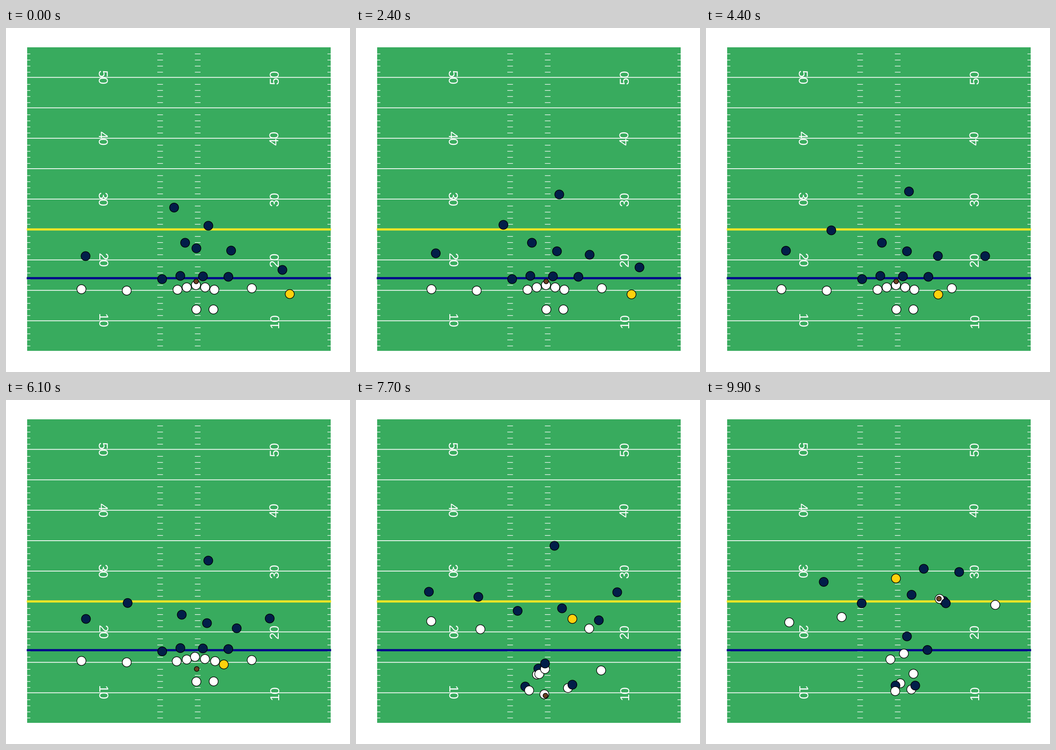
Write a matplotlib script that moves like this. It is 748x748 px and loops after 10 s.

```python
import numpy as np
import matplotlib.pyplot as plt
from matplotlib.animation import FuncAnimation
from matplotlib.patches import Circle, Rectangle

SIZE, DPI, FRAMES = 748, 100, 100
PT = 72 / DPI
GREEN, NAVY, GOLD, BROWN = "#38ab5e", "#021e49", "#ffd10d", "#6b4023"
LEFT, RIGHT, TOP, BOTTOM = 46, 706, 42, 702
SNAP, THROW, CATCH, END = 60, 77, 85, 99

plt.rcParams["text.hinting"] = "none"
fig = plt.figure(figsize=(SIZE / DPI, SIZE / DPI), dpi=DPI, facecolor="white")
ax = fig.add_axes([0, 0, 1, 1])
ax.set(xlim=(0, SIZE), ylim=(SIZE, 0))
ax.axis("off")


def yard_y(yard):
    return 636.6 - 13.23 * (yard - 10)


def rows(ys, x0, x1, width, color="white"):
    ax.hlines(ys, x0, x1, colors=color, linewidth=width * PT, snap=False)


def draw_field():
    ax.add_patch(Rectangle((LEFT, TOP), RIGHT - LEFT, BOTTOM - TOP,
                           facecolor=GREEN, edgecolor="none", zorder=0))
    rows([yard_y(y) for y in range(10, 51, 5)], LEFT, RIGHT, 1.7)
    ticks = [yard_y(y) + 1.9 for y in range(6, 55) if y % 5]
    for x0, x1 in ((LEFT, 53), (329, 341.3), (410.7, 423), (699, RIGHT)):
        rows(ticks, x0, x1, 1.2)
    for yard in range(10, 51, 10):
        for x, dy, turn in ((200.4, 0.3, -90), (592.5, -0.8, 90)):
            ax.text(x, yard_y(yard) + dy, str(yard), rotation=turn,
                    rotation_mode="anchor", ha="center", va="baseline",
                    color="white", family="Liberation Sans",
                    fontsize=28.2 * PT)
    rows(544, LEFT - 1, RIGHT + 1, 4.7, "#00008b")
    rows(438, LEFT - 1, RIGHT + 1, 4.7, "#fde725")


def glide(keys, values):
    """Monotone cubic through the key values, sampled on every frame."""
    t, p = np.asarray(keys, float), np.asarray(values, float)
    h = np.diff(t)
    d = np.diff(p) / h
    m = np.concatenate(([d[0]], np.zeros(len(d) - 1), [d[-1]]))
    for i in range(1, len(d)):
        if d[i - 1] * d[i] > 0:
            m[i] = 2 * d[i - 1] * d[i] / (d[i - 1] + d[i])
    f = np.arange(FRAMES)
    i = np.clip(np.searchsorted(t, f, side="right") - 1, 0, len(h) - 1)
    s = (f - t[i]) / h[i]
    return ((1 + 2 * s) * (1 - s) ** 2 * p[i] + s * (1 - s) ** 2 * h[i] * m[i]
            + s * s * (3 - 2 * s) * p[i + 1] + s * s * (s - 1) * h[i] * m[i + 1])


def smooth(a, b):
    s = np.clip((np.arange(FRAMES) - a) / (b - a), 0, 1)
    return (s * s * (3 - 2 * s))[:, None]


def route(start, throw, catch, end, shift=None):
    """Start, optional shifts before the snap, then three spots after it."""
    spots = {0: start, **(shift or {})}
    spots.setdefault(SNAP, list(spots.values())[-1])
    spots.update({THROW: throw, CATCH: catch, END: end})
    return np.column_stack([glide(list(spots), v) for v in zip(*spots.values())])


def line_spot(k):
    return 413 + 20 * k, 559 + 5 * abs(k)


def block(k, rusher, slip=12):
    """Step between the rusher and the pocket; lose ground after the catch."""
    toward = np.array([410, 665]) - rusher
    toward /= np.linalg.norm(toward, axis=1, keepdims=True)
    gap = 12 + (slip - 12) * smooth(CATCH, END)
    engaged = smooth(SNAP - 2, THROW)
    return np.array(line_spot(k)) * (1 - engaged) + (rusher + gap * toward) * engaged


def ball_path(passer, catcher):
    path = np.tile([413.5, 551.0], (FRAMES, 1))
    snap, held, throw, caught = 58, 64, THROW + 1, CATCH + 1
    path[held:] = passer[held:] + (2.5, 2.8)
    path[caught:] = catcher[caught:] + (-1.5, -0.5)
    for a, b in ((snap, held), (throw, caught)):
        s = np.linspace(0, 1, b - a + 1)[:, None]
        path[a:b + 1] = path[a] * (1 - s) + path[b] * s
    return path


dots = []


def add_dots(color, *paths, radius=9.8):
    for path in paths:
        dot = Circle(path[0], radius, facecolor=color, edgecolor="black",
                     linewidth=1.3 * PT, zorder=10 + len(dots))
        ax.add_patch(dot)
        dots.append((dot, path))


draw_field()

corners = (
    route((173, 496), (158.5, 417), (173, 402), (256, 395.5), {SNAP: (174, 477)}),
    route((601, 526), (568, 418), (569, 375), (550.5, 374),
          {28: (617, 519), 44: (607, 496), SNAP: (574, 477)}))
safeties = (
    route((365.5, 390.5), (266, 428), (277, 448), (338.5, 442),
          {24: (320.5, 428), 44: (272.5, 440), SNAP: (264.5, 441.5)}),
    route((440, 430), (431.5, 317), (433.5, 314), (473.5, 367),
          {24: (442, 362), SNAP: (440, 350)}))
backers = (
    route((389.5, 467), (351.5, 458.5), (365, 454.5), (447, 423.5),
          {24: (382.5, 467)}),
    route((414, 479), (448, 453), (465.5, 454.5), (517, 437), {24: (437, 485.5)}))
nickel = route((489.5, 484), (528, 479), (548, 471), (521.5, 442),
               {24: (508, 493), SNAP: (501.5, 496.5)})

wideouts = (
    route((164, 568), (163.5, 481), (160, 465), (181, 483.5)),
    route((262.5, 571), (270.5, 498.5), (273, 486), (295, 472)))
back = route((451, 612), (533, 588), (586, 544.5), (629, 445.5))
motion = route((617, 578.5), (470.5, 476), (457, 417), (413, 388),
               {16: (617, 579), 44: (505, 579.5), SNAP: (474, 576)})
catcher = route((534.5, 566), (507, 497), (502.5, 478), (508, 432.5))
passer = route((414, 612), (409.5, 640), (410.5, 640), (422.5, 616))

left_end = route((339.5, 546), (368, 623), (392.5, 645), (412, 621))
left_tackle = route((379, 539), (396.5, 584), (404, 582.5), (437, 514))
right_tackle = route((428.3, 540), (411, 573), (427, 585.5), (481.5, 543.5))
right_end = route((483.5, 541), (470.5, 619), (449.5, 641), (455, 621))
guard = route(line_spot(-1), (393.5, 597), (396.5, 598), (401, 564))

add_dots(NAVY, *corners, *safeties, *backers)
add_dots("white", *wideouts, back)
add_dots(GOLD, motion)
add_dots("white", catcher)
add_dots(NAVY, nickel)
add_dots("white", passer, guard, block(2, right_end))
add_dots(NAVY, left_end, left_tackle)
add_dots("white", block(0, left_tackle, 38), block(1, right_tackle, 60))
add_dots(NAVY, right_tackle, right_end)
add_dots("white", block(-2, left_end))
add_dots(BROWN, ball_path(passer, catcher), radius=5.2)


def update(frame):
    for dot, path in dots:
        dot.center = path[frame]
    return [dot for dot, _ in dots]


anim = FuncAnimation(fig, update, frames=FRAMES, interval=100, repeat=True,
                     repeat_delay=0)
plt.show()
```
